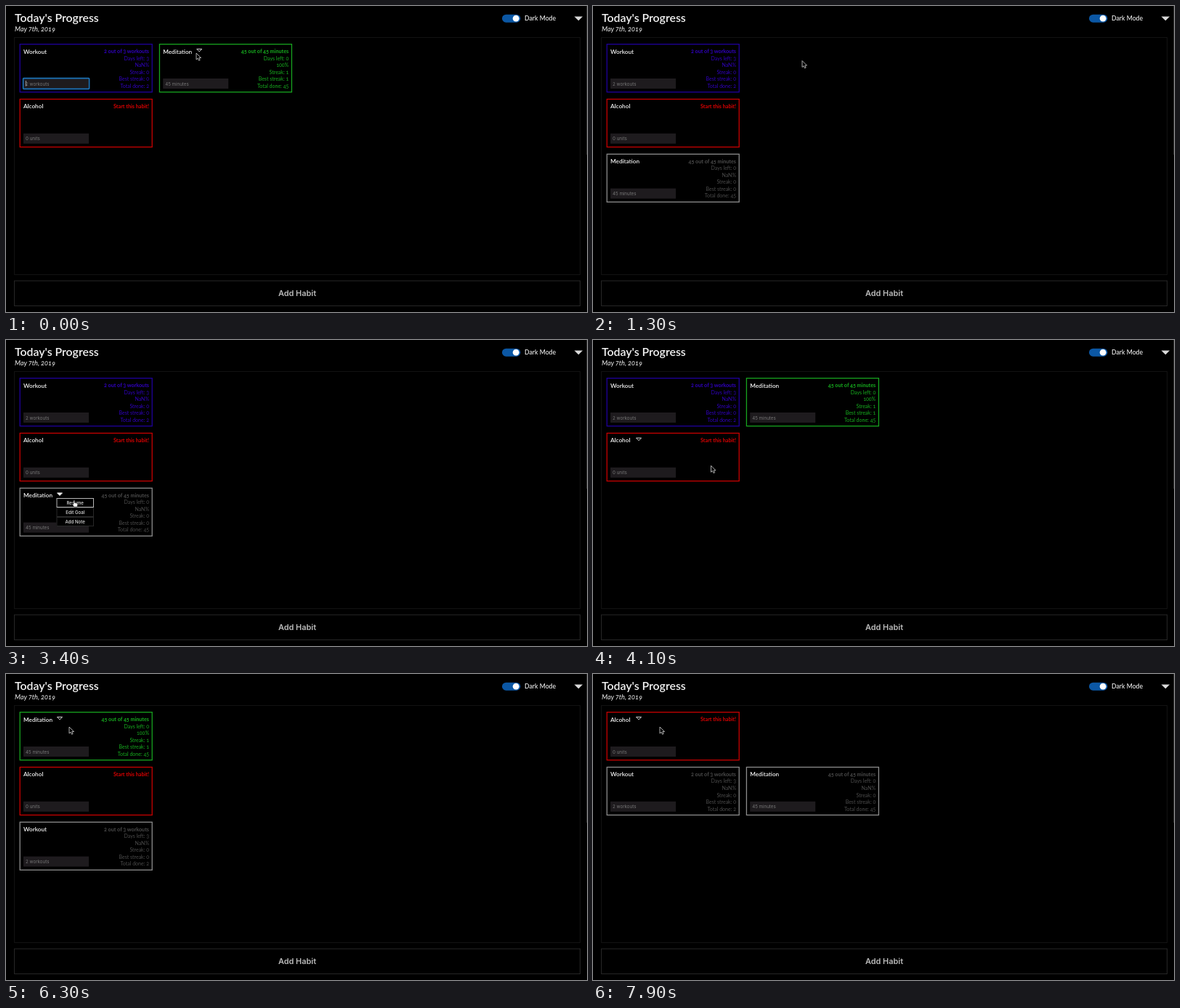
These frames come from a looping animation (800x422 px, 8 s). An HTML page:

```html
<!DOCTYPE html>
<html lang="en">
<head>
<meta charset="utf-8">
<title>Today's Progress</title>
<style>
  html, body { margin: 0; width: 100%; height: 100%; overflow: hidden; background: #000; }
  svg { display: block; width: 800px; height: 422px; font-family: Lato, sans-serif; fill: #f4f4f4;
        font-variant-numeric: oldstyle-nums; }
  .ui { font-family: Inter, sans-serif; font-variant-numeric: normal; }
  .name { font-size: 8.2px; font-weight: 600; }
  .stat { font-size: 7px; text-anchor: end; }
  .lead { font-size: 7.2px; font-weight: 700; }
  .entry { font-size: 6.2px; fill: #777; }
  .item { font-size: 6.1px; font-weight: 500; fill: #e4e4e4; text-anchor: middle; }
</style>
</head>
<body>
<svg viewBox="0 0 800 422">
  <rect width="800" height="422" fill="#000"/>
  <rect x="799" width="1" height="205" fill="#222"/>
  <text x="12" y="21.5" font-size="15.85" font-weight="600">Today's Progress</text>
  <text x="12" y="34.7" font-size="9.2" font-style="italic">May 7th, 2019</text>
  <rect x="683" y="11.7" width="25.4" height="11" rx="5.5" fill="#0b57a4"/>
  <circle cx="702.2" cy="17.2" r="4.4" fill="#fff"/>
  <text x="714" y="20.2" font-size="8.7" font-weight="500">Dark Mode</text>
  <path d="M782.5 14.5h11.6l-5.8 5.8z" fill="#dadada"/>
  <g fill="none">
    <rect x="11.5" y="43.5" width="779" height="327" stroke="#121212"/>
    <rect x="11.5" y="379" width="779" height="34.5" stroke="#262626"/>
  </g>
  <text class="ui" x="401" y="400" font-size="10.9" font-weight="600" fill="#bdbdbd" text-anchor="middle">Add Habit</text>
  <g id="board"></g>
  <g id="cursor"></g>
</svg>
<script>
const LOOP = 8000, GREY = '#4c4c4c';
const habits = {
  W: { name: 'Workout', color: '#3000c0', edge: '#1f009c', entry: '2 workouts', chevron: 43,
       goal: '2 out of 3 workouts', left: 3, total: 2 },
  M: { name: 'Meditation', color: '#17b01f', edge: '#17a31f', entry: '45 minutes', chevron: 51,
       goal: '45 out of 45 minutes', left: 0, total: 45, done: true },
  A: { name: 'Alcohol', color: '#dc0000', edge: '#c80000', entry: '0 units', chevron: 40 }
};

// start time, paused habits, habit with an open menu
const scenes = [
  [0, '', ''], [400, '', 'M'], [1300, 'M', ''], [3100, 'M', 'M'], [3600, '', ''],
  [5600, '', 'W'], [6000, 'W', ''], [6600, 'W', 'M'], [7400, 'WM', '']
];

// time, x, y of the pointer tip
const path = [
  [0, 262, 65], [100, 262, 65], [350, 266, 61], [450, 266, 61], [900, 287, 73], [1000, 288, 75.5],
  [1600, 288, 75.5], [2100, 150, 158], [2500, 72, 212], [2700, 74, 213], [3050, 74, 213],
  [3350, 93, 221], [3600, 93, 221], [3900, 162.5, 173.3], [4100, 162.5, 173.3], [4500, 205, 124],
  [4900, 232, 88], [5000, 225, 82], [5400, 61, 63], [5550, 66, 61], [5650, 66, 61],
  [5900, 86, 72], [6000, 87, 73], [6300, 87, 73], [6550, 74, 61], [6700, 74, 61],
  [7100, 92, 73], [8000, 92, 73]
];

const ARROW = '<path d="M0 0V8.9L2.1 7.1L3.5 10.2L5.1 9.5L3.8 6.5H6.5Z" fill="#000" stroke="#d6d6d6" stroke-width=".8"/>';
const HAND = '<path d="M0 .6Q.9-.5 1.6.6V3.4L5.2 4.2Q6 4.6 5.8 6L5 9H.6L-1.8 5.6Q-1.8 4.4 0 5.5Z" fill="#fff" stroke="#111" stroke-width=".6"/>';

const board = document.getElementById('board');
const cursor = document.getElementById('cursor');
const inside = (x, y, l, t, w, h) => x >= l && x < l + w && y >= t && y < t + h;
const text = (x, y, cls, s, fill) =>
  `<text x="${x}" y="${y}" class="${cls}"${fill ? ` fill="${fill}"` : ''}>${s}</text>`;

// Rows: running habits, habits not started, paused habits
function layout(paused) {
  const running = [...'WM'].filter(k => !paused.includes(k));
  return [running, ['A'], [...paused]].filter(row => row.length).flatMap((row, r) =>
    row.map((key, c) => ({ key, x: 19 + 192.2 * c, y: 52 + 75.8 * r, paused: paused.includes(key) })));
}

function stats(h, paused) {
  if (!h.goal) return ['Start this habit!'];
  const won = h.done && !paused, n = won ? 1 : 0;
  return [h.goal, `Days left: ${h.left}`, won ? '100%' : 'NaN%',
    `Streak: ${n}`, `Best streak: ${n}`, `Total done: ${h.total}`];
}

function card({ key, x, y, paused }, hover, open, focus) {
  const h = habits[key], ink = paused ? GREY : h.color;
  const ring = focus ? '<rect x="4.6" y="47.6" width="91" height="14.8" rx="1" fill="none" stroke="#1b73b8" stroke-width="1.6"/>' +
    '<path d="M8.4 51v7.6" stroke="#ddd" stroke-width=".7"/>' : '';
  const chevron = hover || open
    ? `<path d="M${h.chevron + .5} 7.3h7l-3.5 3.6z" fill="${open ? '#eee' : '#000'}" stroke="#eee" stroke-width=".9"/>` : '';
  return `<g transform="translate(${x} ${y})">
    <rect x=".2" y=".7" width="182" height="66" fill="#000" stroke="${paused ? '#8c8c8c' : h.edge}" stroke-width="1.3"/>
    ${text(5, 13.5, 'name', h.name)}
    ${stats(h, paused).map((s, i) => text(178, 13.1 + 9.55 * i, i ? 'stat' : 'stat lead', s, ink)).join('')}
    <rect x="5" y="48" width="90" height="14" fill="#1e1b1e"/>
    ${text(8, 57.6, 'ui entry', h.entry)}${ring}${chevron}</g>`;
}

function menu({ key, x, y, paused }, active) {
  const row = (s, i) => `<rect x=".5" y="${13 * i + .5}" width="50.5" height="12" fill="#000"
    stroke="${i === active ? '#b5b5b5' : '#282828'}"/>` + text(25.7, 13 * i + 8.7, 'ui item', s);
  const rows = [paused ? 'Resume' : 'Pause', 'Edit Goal', 'Add Note'].map(row);
  return `<g transform="translate(${x + habits[key].chevron - .5} ${Math.round(y + 14)})">
    <rect width="51.5" height="39" fill="#000"/>${rows.join('')}</g>`;
}

function pointer(t) {
  const i = path.findIndex(p => p[0] > t), [t0, x0, y0] = path[i - 1], [t1, x1, y1] = path[i];
  const u = (t - t0) / (t1 - t0), e = u * u * (3 - 2 * u);
  return [x0 + (x1 - x0) * e, y0 + (y1 - y0) * e];
}

let shown = '', shape = '';
function draw(t) {
  const [start, paused, open] = scenes.filter(s => s[0] <= t).pop();
  const [px, py] = pointer(t), cards = layout(paused);
  const owner = cards.find(c => c.key === open);
  let active = -1;
  if (owner) {
    const l = owner.x + habits[open].chevron, top = owner.y + 14;
    if (inside(px, py, l, top, 51, 39)) active = Math.floor((py - top) / 13);
  }
  const over = cards.find(c => inside(px, py, c.x, c.y, 182.5, 67));
  const onChevron = over && inside(px, py, over.x + habits[over.key].chevron, over.y + 6, 8, 6);

  const state = [start, active, over && over.key].join();
  if (state !== shown) {
    shown = state;
    board.innerHTML = cards.map(c => card(c, c === over, c === owner, start === 0 && c.key === 'W')).join('') +
      (owner ? menu(owner, active) : '');
  }
  const look = active >= 0 || onChevron ? HAND : ARROW;
  if (look !== shape) cursor.innerHTML = shape = look;
  cursor.setAttribute('transform', `translate(${px.toFixed(2)} ${py.toFixed(2)})`);
}

const begin = performance.now();
function tick() {
  draw((performance.now() - begin) % LOOP);
  requestAnimationFrame(tick);
}
tick();
</script>
</body>
</html>
```
